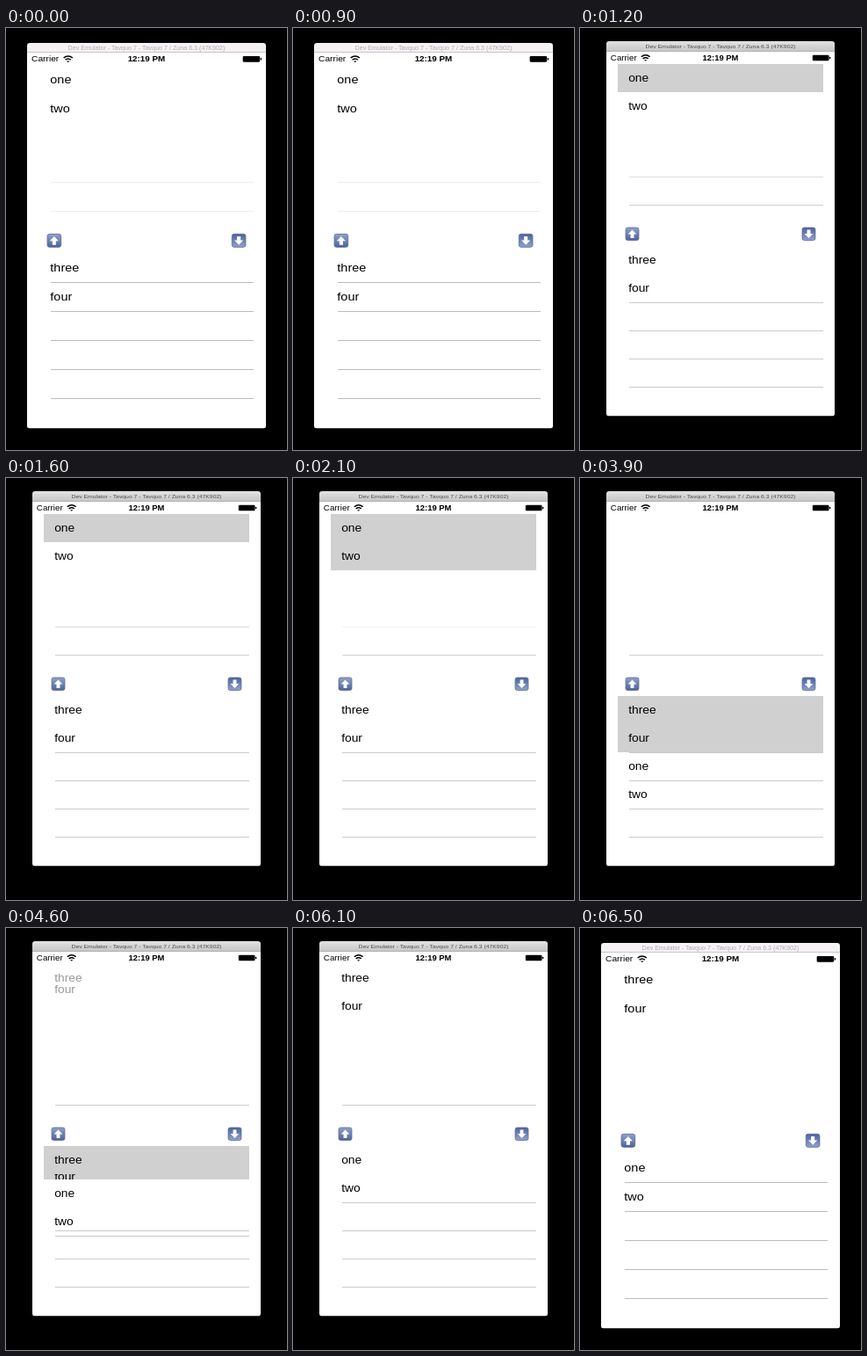
These frames come from a looping animation (320 by 480 pixels, 6.6 s). An HTML page:

```html
<!DOCTYPE html>
<html lang="en">
<head>
<meta charset="utf-8">
<title>Rows moving between two lists</title>
<style>
  html, body { margin: 0; width: 100%; height: 100%; overflow: hidden; background: #000; }
  svg { display: block; width: 100%; height: 100%; }
  text { font-family: "Liberation Sans", Arial, sans-serif; fill: #000; }
  .row text { font-size: 17px; }
  .crisp { shape-rendering: crispEdges; }
</style>
</head>
<body>
<svg viewBox="0 0 320 480">
  <defs>
    <linearGradient id="bar" x1="0" y1="0" x2="0" y2="1">
      <stop offset="0" stop-color="#e2e2e2"/><stop offset="1" stop-color="#c6c6c6"/>
    </linearGradient>
    <linearGradient id="key" x1="0" y1="0" x2="0" y2="1">
      <stop offset="0" stop-color="#91a2c8"/><stop offset="1" stop-color="#4c629c"/>
    </linearGradient>
    <g id="arrow">
      <rect x="-9.2" y="-10" width="18.4" height="20" rx="3" fill="url(#key)" stroke="#5b6a92" stroke-width="1"/>
      <path d="M0-6.5 6 .5H2.4V6.5H-2.4V.5H-6Z" fill="#fff"/>
    </g>
  </defs>
  <g id="phone">
    <path id="titleBar"/>
    <text id="title" x="160" text-anchor="middle" font-size="8.4">Dev Emulator - Tavquo 7 - Tavquo 7 / Zuna 6.3 (47K902)</text>
    <path d="M0 0H320V567q0 3-3 3H3q-3 0-3-3Z" fill="#fff"/>
    <text x="6" y="14.4" font-size="12">Carrier</text>
    <g fill="none" stroke="#000" stroke-width="2">
      <path d="M49 8.5q6-5.6 12 0M51.3 11.4q3.7-3.4 7.4 0"/>
      <path d="M53 13.2h4l-2 2.3Z" fill="#000" stroke="none"/>
    </g>
    <text x="160" y="14.4" font-size="11.6" font-weight="bold" text-anchor="middle">12:19 PM</text>
    <rect x="289" y="5.6" width="23" height="9" rx="1.5"/>
    <rect x="312.6" y="8.4" width="1.6" height="3.4" rx=".8"/>
    <g id="lists"></g>
    <use href="#arrow" x="36.3" y="285.5"/>
    <use href="#arrow" transform="translate(283.7 285.5) scale(1 -1)"/>
  </g>
</svg>
<script>
const LOOP = 6600, STEP = 100, ROW = 44, TOP = 20, BOTTOM = 304.4;
const SELECTED = '#d0d0d0';
const $ = id => document.getElementById(id);
const lists = $('lists');

function add(tag, attrs, parent = lists) {
  const el = document.createElementNS('http://www.w3.org/2000/svg', tag);
  set(el, attrs);
  parent.appendChild(el);
  return el;
}

function set(el, attrs) {
  for (const name in attrs) el.setAttribute(name, attrs[name]);
}

function makeRow(label) {
  const g = add('g', { class: 'row' });
  const bg = add('rect', { class: 'crisp', x: 16, width: 288, height: ROW }, g);
  add('text', { x: 31, y: 27.4 }, g).textContent = label;
  return { g, bg };
}

function place(row, y, alpha, fill = 'none') {
  set(row.g, { transform: `translate(0 ${y})`, opacity: alpha });
  set(row.bg, { fill });
}

const makeLine = y => add('rect', { class: 'crisp', x: 31.4, y, width: 272.6, height: 1.36 });

function makeRows(labels) {
  return Object.fromEntries(labels.map(label => [label, makeRow(label)]));
}

// Paint order matters: rows sliding up cover the ones being removed.
const top4 = makeRows(['two', 'one', 'four', 'three']);
const low4 = makeRows(['four', 'three', 'one', 'two']);
const topLines = [4, 5].map(k => makeLine(TOP + ROW * k));
const lowLines = [1, 2, 3, 4, 5].map(k => makeLine(BOTTOM + ROW * k));
const slideLine = makeLine(0);

function ease(t, start, length = 300) {
  const p = Math.min(1, Math.max(0, (t - start) / length));
  return p * p * (3 - 2 * p);
}

const moving = p => p > 0 && p < 1;
const paint = (line, color) => set(line, { fill: color || 'none' });

function drawWindow(large) {
  const h = large ? 14.4 : 16;
  set($('phone'), {
    transform: large ? 'translate(24 27.7) scale(.85 .75)' : 'translate(30 26.6) scale(.8125 .7273)'
  });
  set($('titleBar'), {
    d: `M0 0V${4 - h}q0-4 4-4H316q4 0 4 4V0Z`,
    fill: large ? '#f5f1f5' : 'url(#bar)'
  });
  set($('title'), { y: large ? -3.8 : -5, style: `fill:${large ? '#b3abb3' : '#4c4c4c'}` });
}

function render(t) {
  const large = t < 1200 || t >= 6500;
  const down = ease(t, 2678), up = ease(t, 4470);
  const pick = from => t >= from ? SELECTED : 'none';
  drawWindow(large);

  place(top4.one, TOP, 1 - down, pick(1200));
  place(top4.two, TOP + ROW * (1 - down), 1 - down, pick(2100));
  place(top4.three, TOP, up);
  place(top4.four, TOP + ROW * up, up);

  const cover = up > 0 ? '#fff' : 'none';
  const oneY = BOTTOM + ROW * (1 + down - 2 * up);
  const twoY = BOTTOM + ROW * (1 + 2 * down - 2 * up);
  const shown = Math.min(1, down * 1.2);
  const left = up < 1 ? 1 : 0;
  place(low4.three, BOTTOM, left, pick(3500));
  place(low4.four, BOTTOM + ROW * (1 - up), left, pick(3900));
  place(low4.one, oneY, shown, cover);
  place(low4.two, twoY, shown, cover);

  const gray = large ? '#bcbcbc' : '#cbcbcb';
  paint(topLines[0], t < 1200 ? '#eee' : t < 2100 ? '#dcdcdc' : t < 2700 && '#f3f3f3');
  paint(topLines[1], t < 1200 ? '#eee' : !large && '#d0d0d0');
  paint(lowLines[0], large && gray);
  paint(lowLines[1], !moving(up) && gray);
  paint(lowLines[2], !moving(down) && gray);
  paint(lowLines[3], !moving(down) && gray);
  paint(lowLines[4], gray);
  set(slideLine, { y: (moving(up) ? twoY : oneY) + ROW });
  paint(slideLine, (moving(down) || moving(up)) && gray);
}

const begin = performance.now();
function tick() {
  const t = (performance.now() - begin) % LOOP;
  render(Math.floor((t + 0.5) / STEP) * STEP % LOOP);
  requestAnimationFrame(tick);
}
tick();
</script>
</body>
</html>
```
